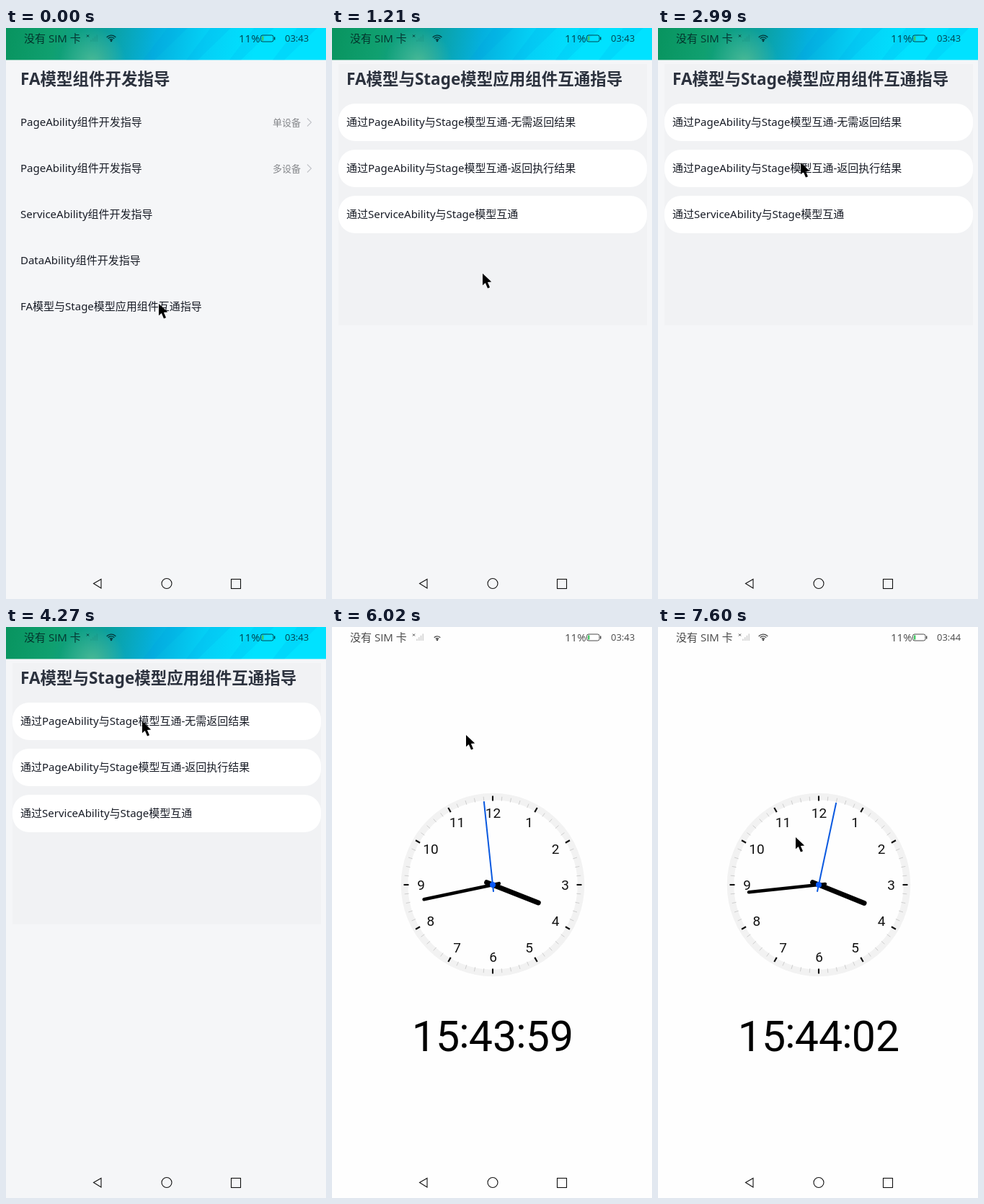
An HTML page with a canvas that plays this animation: 444 px wide and 793 px high, repeating every 8 s.

```html
<!DOCTYPE html>
<html lang="zh-CN">
<head>
<meta charset="utf-8">
<title>组件互通</title>
<style>
html, body { margin: 0; width: 100%; height: 100%; overflow: hidden; background: #f5f6f8; }
canvas { display: block; width: 444px; height: 793px; }
</style>
</head>
<body>
<canvas id="stage"></canvas>
<script>
const W = 444, H = 793, LOOP = 8000;
const OPEN_LIST = 500, OPEN_CLOCK = 5450, NEW_MINUTE = 6300;
const BAR_H = 44.4, ROW = 64, TAU = 2 * Math.PI;
const CJK = '"Noto Sans CJK SC", "Noto Sans CJK", sans-serif';
const UI = '"Noto Sans", ' + CJK;
const BAR = '"Open Sans", ' + CJK;
const DIAL = 'Roboto, ' + CJK;

// Pointer stops; each leg between two stops is made in equal hops
const HOPS = 3;
const STOPS = [
  { t: 740, x: 212, y: 383 }, { t: 2110, x: 203, y: 257 }, { t: 2990, x: 198, y: 187 },
  { t: 4270, x: 189, y: 131 }, { t: 5740, x: 189, y: 131 }, { t: 6580, x: 181, y: 188 },
  { t: 7600, x: 191, y: 292 }
];

const canvas = document.getElementById('stage');
const ctx = canvas.getContext('2d');
const dpr = window.devicePixelRatio || 1;
canvas.width = W * dpr;
canvas.height = H * dpr;

const pad = n => String(n).padStart(2, '0');
const polar = (cx, cy, r, turn) => [cx + r * Math.sin(turn * TAU), cy - r * Math.cos(turn * TAU)];

function text(str, x, y, size, color, family = UI, align = 'left', weight = 400) {
  ctx.font = `${weight} ${size}px ${family}`;
  ctx.textAlign = align;
  ctx.fillStyle = color;
  ctx.fillText(str, x, y);
}

function rect(x, y, w, h, color) {
  ctx.fillStyle = color;
  ctx.fillRect(x, y, w, h);
}

function path(points, closed) {
  ctx.beginPath();
  points.forEach(([x, y]) => ctx.lineTo(x, y));
  if (closed) ctx.closePath();
}

function circle(x, y, r) {
  ctx.beginPath();
  ctx.arc(x, y, r, 0, TAU);
}

function fill(color) {
  ctx.fillStyle = color;
  ctx.fill();
}

function stroke(color, width) {
  ctx.strokeStyle = color;
  ctx.lineWidth = width;
  ctx.stroke();
}

function shade(gradient, ...colors) {
  colors.forEach((c, i) => gradient.addColorStop(i / (colors.length - 1), c));
  return gradient;
}

function wallpaper() {
  const sky = ctx.createLinearGradient(0, 0, 340, 60);
  rect(0, 0, W, BAR_H, shade(sky, '#08945f', '#10a070', '#0c9f9c', '#04b0de', '#04d0f6', '#00e2ff'));
  const glow = ctx.createRadialGradient(120, 46, 0, 120, 46, 46);
  rect(74, 0, 92, BAR_H, shade(glow, 'rgba(110,200,150,.6)', 'rgba(110,200,150,0)'));
  // slanted streaks
  for (let x = 190; x < 400; x += 60) {
    path([[x + 34, 0], [x + 62, 0], [x + 16, BAR_H], [x, BAR_H]], true);
    fill('rgba(0,150,220,.13)');
  }
}

function wifi(arcs, color) {
  for (let i = 1; i <= arcs; i++) {
    ctx.beginPath();
    ctx.arc(146, 18.5, i * 2.8, -TAU * .385, -TAU * .115);
    stroke(color, 1.4);
  }
  circle(146, 18, 1.3);
  fill(color);
}

function statusBar(t, light) {
  const ink = light ? '#4a4a4a' : 'rgba(0,20,25,.76)';
  text('没有 SIM 卡', 25, 19.5, 15, ink, BAR);
  for (const d of [-1.5, 1.5]) {
    path([[113.5 - d, 9.5], [113.5 + d, 12.5]]);
    stroke(ink, 1);
  }
  for (let i = 1; i <= 4; i++) {
    rect(114.2 + i * 2.8, 19 - i * 2.4, 1.8, i * 2.4, light ? '#d6d6d6' : 'rgba(0,60,50,.08)');
  }
  const weak = t >= 6020 && t < 6890;
  wifi(weak ? 2 : 3, ink);
  text('11%', 323, 19.5, 15, ink, BAR);
  ctx.beginPath();
  ctx.roundRect(353.5, 10, 17.5, 9, 2.5);
  stroke(ink, 1);
  rect(372, 12.5, 1.4, 4, ink);
  rect(355, 11.5, 2.4, 6, '#3fc560');
  text(t < NEW_MINUTE ? '03:43' : '03:44', 387, 19, 13, ink, BAR);
}

function navBar() {
  const y = 772;
  path([[121.5, y - .5], [132, y - 6.5], [132, y + 6]], true);
  stroke('#111', 1.1);
  circle(223, y - .5, 7);
  stroke('#111', 1.1);
  ctx.strokeRect(312.5, y - 6.5, 13, 13);
}

function page(title, items) {
  text(title, 20, 79, 22.5, '#2c323e', UI, 'left', 700);
  items.forEach((item, i) => text(item, 20, 135.7 + i * ROW, 15, '#181c26', UI, 'left', 500));
}

function menu() {
  page('FA模型组件开发指导', [
    'PageAbility组件开发指导', 'PageAbility组件开发指导', 'ServiceAbility组件开发指导',
    'DataAbility组件开发指导', 'FA模型与Stage模型应用组件互通指导'
  ]);
  ['单设备', '多设备'].forEach((label, i) => {
    const y = 131 + i * ROW;
    text(label, 370, y + 4.7, 13, '#85878b');
    path([[418, y - 5.5], [423.5, y], [418, y + 5.5]]);
    stroke('#c2c4c8', 1.1);
  });
}

function submenu() {
  rect(9, 50, 428, 363, '#f1f2f4');
  for (let i = 0; i < 3; i++) {
    ctx.beginPath();
    ctx.roundRect(9, 105 + i * ROW, 428, 52, 23);
    fill('#fff');
  }
  page('FA模型与Stage模型应用组件互通指导', [
    '通过PageAbility与Stage模型互通-无需返回结果',
    '通过PageAbility与Stage模型互通-返回执行结果',
    '通过ServiceAbility与Stage模型互通'
  ]);
}

// Radial line on the dial; turn is a fraction of the full circle from 12
function ray(turn, from, to, width, color, cap = 'butt') {
  ctx.lineCap = cap;
  path([from, to].map(r => polar(223, 358, r, turn)));
  stroke(color, width);
  ctx.lineCap = 'butt';
}

function clock(t) {
  // the first tick is skipped while the page opens
  const ticks = Math.floor((t - OPEN_CLOCK) / 530);
  const total = 43 * 60 + 57 + ticks + (ticks > 0);
  const min = Math.floor(total / 60), sec = total % 60;

  circle(223, 358, 122.5);
  stroke('#f2f2f2', 9.5);
  for (let i = 0; i < 60; i++) {
    if (i % 5) ray(i / 60, 117, 123, .9, '#c9c9c9');
    else ray(i / 60, 116.5, 123.5, 2.1, '#111');
  }
  for (let n = 1; n <= 12; n++) {
    const [x, y] = polar(223.5, 365, 100, n / 12);
    text(n, x, y, 19, '#111', DIAL, 'center');
  }
  ray((3 + min / 60) / 12, -9, 68, 7, '#000', 'round');
  ray(min / 60, -9, 97.5, 4.6, '#000', 'round');
  ray(sec / 60, -10, 116.5, 2, '#0a59e0');
  circle(223, 358, 4);
  fill('#0a59f7');

  [15, min, sec].forEach((n, i) => {
    const x = 144 + i * 79;
    text(pad(n), x, 588.5, 59, '#000', DIAL, 'center');
    if (i) text(':', x - 39.5, 584, 59, '#000', DIAL, 'center');
  });
}

function pointerAt(t) {
  const next = STOPS.findIndex(s => s.t > t);
  if (next === 0) return STOPS[0];
  if (next < 0) return STOPS[STOPS.length - 1];
  const a = STOPS[next - 1], b = STOPS[next];
  const k = Math.floor(HOPS * (t - a.t) / (b.t - a.t)) / HOPS;
  return { x: Math.round(a.x + (b.x - a.x) * k), y: Math.round(a.y + (b.y - a.y) * k) };
}

function pointer({ x, y }) {
  path([[0, 0], [0, 16.3], [3.8, 13], [7, 20.6], [10, 19.3], [6.9, 12], [12.2, 11.6]]
    .map(([dx, dy]) => [x + dx, y + dy]), true);
  fill('#000');
}

function draw(t) {
  const onClock = t >= OPEN_CLOCK;
  ctx.setTransform(dpr, 0, 0, dpr, 0, 0);
  rect(0, 0, W, H, onClock ? '#fefefe' : '#f5f6f8');
  if (!onClock) wallpaper();
  statusBar(t, onClock);
  navBar();
  if (onClock) clock(t);
  else if (t < OPEN_LIST) menu();
  else submenu();
  pointer(pointerAt(t));
}

function tick() {
  draw(performance.now() % LOOP);
  requestAnimationFrame(tick);
}
tick();
</script>
</body>
</html>
```
